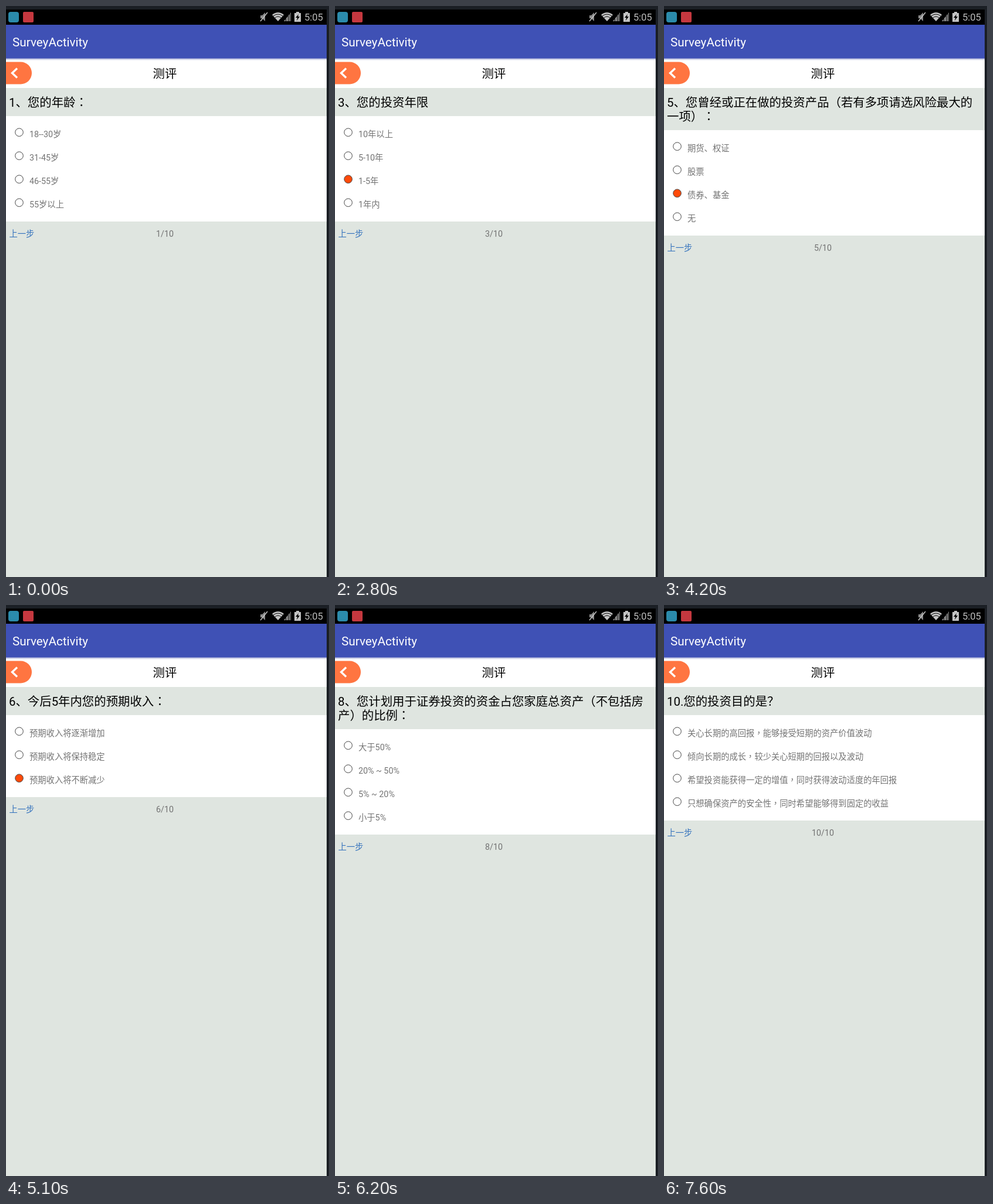
Recreate the animation shown at these times as an HTML page. Size 551 px wide and 975 px high, loop 8000 ms.

```html
<!DOCTYPE html>
<html lang="zh-CN">
<head>
<meta charset="utf-8">
<title>测评</title>
<style>
html, body { margin: 0; width: 100%; height: 100%; overflow: hidden; background: #1b1f25; }
svg { display: block; }
text { font: 14.3px Roboto, "Noto Sans CJK SC", "Noto Sans CJK", sans-serif; fill: #737373;
  white-space: pre; text-spacing-trim: space-all; }
.mid { font-family: "Noto Sans CJK TC", "Noto Sans CJK", sans-serif; }
.big { font-size: 20.4px; fill: #000; }
</style>
</head>
<body>
<svg width="551" height="975" viewBox="0 0 551 975">
  <defs>
    <linearGradient id="shade" x2="0" y2="1">
      <stop stop-color="#a9afd6"/><stop offset="1" stop-color="#fff"/>
    </linearGradient>
  </defs>
  <rect width="551" height="975" fill="#1b1f25"/>
  <rect y="6" width="547" height="26" fill="#000"/>
  <rect x="4" y="10" width="18" height="18" rx="4" fill="#2b8bab"/>
  <rect x="29" y="10" width="18" height="18" rx="2" fill="#c5383f"/>
  <g fill="#c4c4c4">
    <path d="M434 16h3l5-5v15l-5-5h-3z" fill="#8b8b8b"/>
    <path d="M434 26L446 11" stroke="#c4c4c4" stroke-width="1.5"/>
    <path d="M454 15Q464 7 474 15L464 26z"/>
    <path d="M456 17Q464 11 472 17M459 20Q464 16 469 20" fill="none" stroke="#000"/>
    <path d="M474 26L486 11V26z" fill="#969696"/>
    <path d="M477.5 11V26M481.5 11V26M484.5 11V26" stroke="#000"/>
    <path d="M495 10h5v2h3v15h-11v-15h3z"/>
    <path d="M499 14l-5 6h3l-1 5 5-7h-3z" fill="#000"/>
  </g>
  <text x="509" y="25" style="font-size:16.5px;fill:#bdbdbd">5:05</text>
  <rect y="32" width="547" height="58" fill="#3f51b5"/>
  <text x="11" y="69" style="font-size:20.7px;fill:#fff">SurveyActivity</text>
  <rect y="90" width="547" height="50" fill="#fff"/>
  <rect y="89.5" width="547" height="3.5" fill="url(#shade)"/>
  <path d="M0 95.5H25A19 19 0 0 1 25 133.5H0z" fill="#ff7541"/>
  <path d="M19 106.5L10.5 114.5L19 122.5" fill="none" stroke="#fff" stroke-width="3.4"/>
  <text class="big" x="250.5" y="123">测评</text>
  <rect y="140" width="547" height="835" fill="#dfe5e0"/>
  <g id="page"></g>
</svg>
<script>
// start time, time of the choice, chosen option, title lines, options
const pages = [
  [0, 1200, 0, "1、您的年龄：", "18--30岁|31-45岁|46-55岁|55岁以上"],
  [1500, 2100, 1, "2、您的家庭年收入：", "50万以上|20-50万|10-20万|10万以下"],
  [2300, 2800, 2, "3、您的投资年限", "10年以上|5-10年|1-5年|1年内"],
  [3100, 3500, 1, "4、您的投资经验：",
    "我目前是一位积极和有经验的证券投资者，并倾向于自己作出投资决定|" +
    "我目前具有一定的证券投资经验，需要进一步的指导|" +
    "我目前有过购买国债，货币型基金等保本型金融产品投资经验|" +
    "我除了银行活期和定期储蓄存款外，基本没有其他投资经验"],
  [3800, 4200, 2, "5、您曾经或正在做的投资产品（若有多项请选风险最大的|一项）：",
    "期货、权证|股票|债券、基金|无"],
  [4500, 5100, 2, "6、今后5年内您的预期收入：",
    "预期收入将逐渐增加|预期收入将保持稳定|预期收入将不断减少"],
  [5400, 5900, 0, "7、以下哪项描述最符合您的投资态度？",
    "希望赚取高回报，愿意为此承担较大本金损失|" +
    "寻求资金的较高收益和成长性，愿意为此承担有限本金损失|" +
    "保守投资，不希望本金损失，愿意承担一定幅度的收益波动|" +
    "厌恶风险，不希望本金损失，希望获得稳定回报"],
  [6200, 6600, 1, "8、您计划用于证券投资的资金占您家庭总资产（不包括房|产）的比例：",
    "大于50%|20% ~ 50%|5% ~ 20%|小于5%"],
  [6900, 7300, 0, "9、您在投资中能够接受的最大本金损失大致是多少？",
    "最大本金亏损50%以上|最大本金亏损20% ~ 50%|最大本金亏损5% ~ 20%|最大本金亏损5%以内"],
  [7600, 8000, 0, "10.您的投资目的是？",
    "关心长期的高回报，能够接受短期的资产价值波动|" +
    "倾向长期的成长，较少关心短期的回报以及波动|" +
    "希望投资能获得一定的增值，同时获得波动适度的年回报|" +
    "只想确保资产的安全性，同时希望能够得到固定的收益"]
];
const pageBox = document.getElementById("page");

const label = (x, y, str, attrs = "") => {
  const body = str.replace(/[，：]/g, '<tspan class="mid" lang="zh-TW">$&</tspan>');
  return `<text x="${x}" y="${y}" ${attrs}>${body}</text>`;
};

function render(index, chosen) {
  const [, , pick, title, list] = pages[index];
  const lines = title.split("|"), options = list.split("|");
  const top = 164 + 24 * lines.length, height = 40 * options.length + 20;
  const foot = top + height + 26;
  let out = lines.map((s, i) => label(5, 172 + 24 * i, s, 'class="big"')).join("");
  out += `<rect y="${top}" width="547" height="${height}" fill="#fff"/>`;
  options.forEach((s, i) => {
    const y = top + 40 * i;
    const fill = chosen && i === pick ? "#ff4a0a" : "#fff";
    out += `<circle cx="22.5" cy="${y + 27.7}" r="6.8" fill="${fill}" stroke="#444"/>`;
    out += label(40, y + 36, s);
  });
  out += label(5.5, foot, "上一步", 'style="fill:#3573bd"');
  out += label(271, foot, `${index + 1}/${pages.length}`, 'text-anchor="middle"');
  pageBox.innerHTML = out;
}

let shown = "";
function tick() {
  const t = performance.now() % 8000;
  const index = pages.findLastIndex(p => t >= p[0]);
  const chosen = t >= pages[index][1];
  const key = index + "," + chosen;
  if (key !== shown) render(index, chosen);
  shown = key;
  requestAnimationFrame(tick);
}
tick();
</script>
</body>
</html>
```
